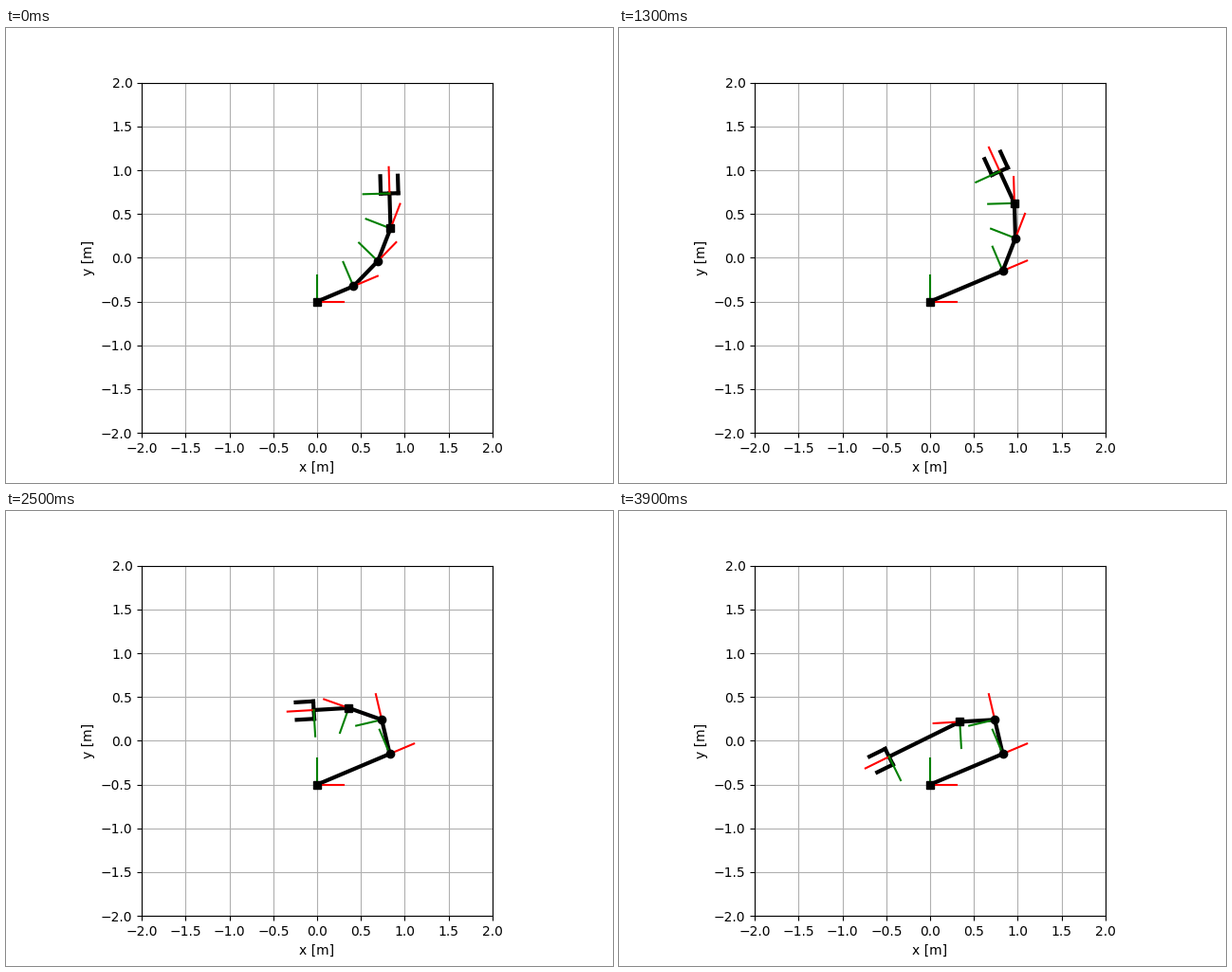
A matplotlib script that plays this animation: 640 by 480 pixels, repeating every 4 s.

```python
import numpy as np
import matplotlib.pyplot as plt
from matplotlib.animation import FuncAnimation

FRAMES, INTERVAL = 40, 100
PHASE = 10                    # steps spent on each joint
STEP_LEN, STEP_ANG = 0.05, 0.1
BASE = np.array([0.0, -0.5])
AXIS_LEN = 0.3
GRIP_HALF, GRIP_LEN = 0.1, 0.2

fig, ax = plt.subplots(figsize=(6.4, 4.8), dpi=100)
ax.set_xlim(-2, 2)
ax.set_ylim(-2, 2)
ax.set_aspect("equal")
ticks = np.arange(-2, 2.01, 0.5)
ax.set_xticks(ticks)
ax.set_yticks(ticks)
ax.set_xlabel("x [m]")
ax.set_ylabel("y [m]")
ax.grid(True)


def make_lines(count, style, **kw):
    return [ax.plot([], [], style, **kw)[0] for _ in range(count)]


links = make_lines(4, "k-", lw=3)
gripper = make_lines(3, "k-", lw=3)
x_axes = make_lines(5, "r-", lw=1.5)
y_axes = make_lines(5, "g-", lw=1.5)
joints = [ax.plot([], [], "k" + m, ms=6)[0] for m in "soos"]


def segment(line, a, b):
    line.set_data([a[0], b[0]], [a[1], b[1]])


def unit(angle):
    return np.array([np.cos(angle), np.sin(angle)])


def pose(i):
    """Joint positions and link headings after i + 1 steps."""
    done = np.clip(i + 1 - PHASE * np.arange(4), 0, PHASE)
    lengths = [0.4 + STEP_LEN * done[0], 0.4, 0.4, 0.4 + STEP_LEN * done[3]]
    turns = [0.4, 0.4 + STEP_ANG * done[1], 0.4 + STEP_ANG * done[2], 0.4]
    headings = np.cumsum(turns)
    points = [BASE]
    for length, heading in zip(lengths, headings):
        points.append(points[-1] + length * unit(heading))
    return points, [0.0, *headings]


def update(i):
    points, headings = pose(i)
    for link, a, b in zip(links, points, points[1:]):
        segment(link, a, b)
    for k, (p, h) in enumerate(zip(points, headings)):
        segment(x_axes[k], p, p + AXIS_LEN * unit(h))
        segment(y_axes[k], p, p + AXIS_LEN * unit(h + np.pi / 2))
    for joint, p in zip(joints, points):
        joint.set_data([p[0]], [p[1]])

    tip, heading = points[-1], headings[-1]
    side = GRIP_HALF * unit(heading + np.pi / 2)
    reach = GRIP_LEN * unit(heading)
    segment(gripper[0], tip - side, tip + side)
    segment(gripper[1], tip - side, tip - side + reach)
    segment(gripper[2], tip + side, tip + side + reach)
    return links + gripper + x_axes + y_axes + joints


anim = FuncAnimation(fig, update, frames=FRAMES, interval=INTERVAL,
                     init_func=lambda: update(0), repeat=True, repeat_delay=0)
plt.show()
```
